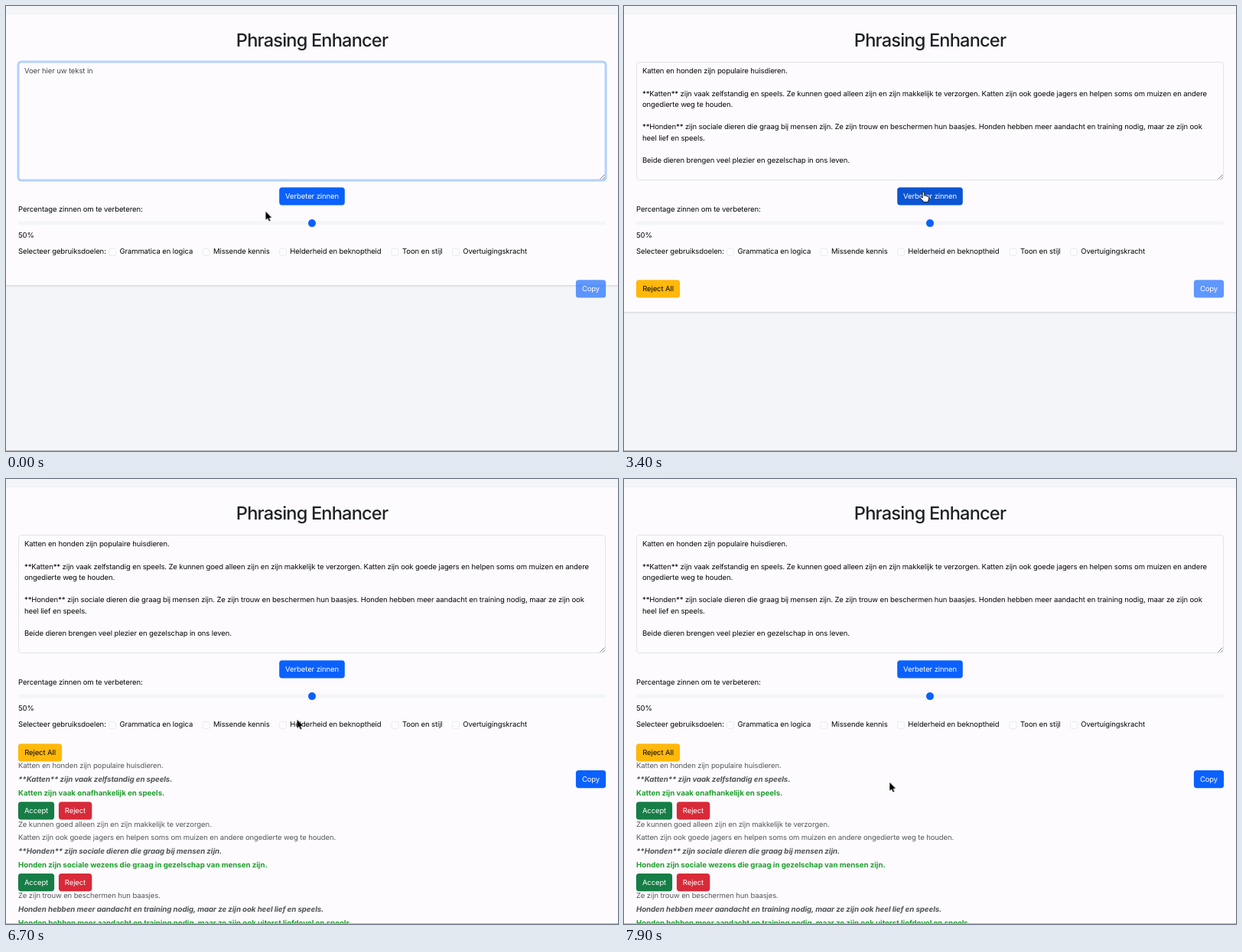
An HTML page for the animation above (8000 ms loop, 800 by 582 pixels).

```html
<!DOCTYPE html>
<html lang="nl">
<head>
<meta charset="utf-8">
<title>Phrasing Enhancer</title>
<style>
  html, body { margin: 0; width: 100%; height: 100%; overflow: hidden; background: #f4f5f8; }
  svg { display: block; width: 800px; height: 582px; }
  text {
    font: 400 9.5px Inter, Roboto, sans-serif;
    letter-spacing: -.105px;
    white-space: pre;
    text-rendering: geometricPrecision;
    fill: #050507;
  }
  .title { font-size: 23.6px; font-weight: 500; letter-spacing: -.82px; fill: #1f2226; }
  .mid { text-anchor: middle; }
  .light text { fill: #fff; }
  .hint { fill: #44484d; }
  .card, .field { fill: #fdfbfe; }
  .card { filter: drop-shadow(0 1px 1.5px rgba(0, 0, 0, .14)); }
  .field { stroke: #e2e4e9; }
  .kept { fill: #53575c; }
  .old, .new { font-size: 9.73px; font-weight: 700; }
  .old { fill: #505459; font-style: italic; letter-spacing: -.08px; }
  .new { fill: #1f9e2f; letter-spacing: -.035px; }
  .blue { fill: #0b61fd; }
  .green { fill: #177d46; }
  .red { fill: #d82a38; }
  .yellow { fill: #ffb80b; }

  .placeholder, .draft, .short, .waiting, .disabled, .results, .arrow, .hand {
    animation: 8s step-end infinite;
  }
  .placeholder { animation-name: placeholder; }
  .draft { animation-name: draft; }
  .short { animation-name: short; }
  .waiting { animation-name: waiting; }
  .disabled { animation-name: disabled; }
  .results { animation-name: results; }
  .arrow { animation-name: arrow; }
  .hand { animation-name: hand; }
  .ring { animation: ring 8s linear infinite; }
  .submit { animation: submit 8s linear infinite; }
  .page { animation: scroll 8s linear infinite; }
  .cursor { animation: move 8s linear infinite; }

  @keyframes placeholder { 0% { opacity: 1 } 1.25%, 100% { opacity: 0 } }
  @keyframes draft { 0% { opacity: 0 } 1.25%, 100% { opacity: 1 } }
  @keyframes short { 0% { opacity: 1 } 30%, 100% { opacity: 0 } }
  @keyframes waiting { 0% { opacity: 0 } 30% { opacity: 1 } 75%, 100% { opacity: 0 } }
  @keyframes disabled { 0% { opacity: .65 } 75%, 100% { opacity: 0 } }
  @keyframes results { 0% { opacity: 0 } 75%, 100% { opacity: 1 } }
  @keyframes arrow { 0% { opacity: 1 } 8.75% { opacity: 0 } 74%, 100% { opacity: 1 } }
  @keyframes hand { 0% { opacity: 0 } 8.75% { opacity: 1 } 74%, 100% { opacity: 0 } }
  @keyframes ring { 0%, 26.5% { opacity: 1 } 28.4%, 100% { opacity: 0 } }
  @keyframes submit {
    0%, 8.75% { fill: #0b61fd }
    10.6%, 26.5% { fill: #0b54d3 }
    28.4%, 29.9% { fill: #0a4cc4 }
    31.8%, 74% { fill: #0b54d3 }
    75.9%, 100% { fill: #0b61fd }
  }
  @keyframes scroll {
    0%, 84.4% { transform: none }
    86%, 88% { transform: translateY(-3.4px) }
    90%, 100% { transform: none }
  }
  @keyframes move {
    0%, 3.75% { transform: translate(339.5px, 268.8px) }
    17.5%, 60% { transform: translate(391px, 243px) }
    70%, 72% { transform: translate(391px, 246px) }
    82%, 87.5% { transform: translate(380.5px, 314.8px) }
    92.5% { transform: translate(373px, 360px) }
    98.75%, 100% { transform: translate(347.3px, 396.8px) }
  }
</style>
</head>
<body>
<svg viewBox="0 0 800 582">
  <defs>
    <rect id="box" x=".5" y=".5" width="9" height="9" rx="2" fill="#fdfbfe" stroke="#e9ebee"/>
    <g id="copy" class="light">
      <rect class="blue" x="744.9" width="39.2" height="23.2" rx="3.6"/>
      <text class="mid" x="764.5" y="15">Copy</text>
    </g>
    <g id="rejectAll">
      <rect class="yellow" x="15.9" width="57.2" height="23.2" rx="3.6"/>
      <text class="mid" x="44.5" y="15">Reject All</text>
    </g>
    <g id="choice" class="light">
      <rect class="green" x="15.9" width="47.2" height="23.2" rx="3.6"/>
      <text class="mid" x="39.5" y="15">Accept</text>
      <rect class="red" x="68.9" width="43.4" height="23.2" rx="3.6"/>
      <text class="mid" x="90.5" y="15">Reject</text>
    </g>
  </defs>

  <rect width="800" height="582" fill="#f4f5f8"/>
  <g class="page">
    <g class="short"><rect class="card" x="-5" y="11" width="810" height="354"/></g>
    <g class="waiting">
      <rect class="card" x="-5" y="11" width="810" height="389"/>
      <use href="#rejectAll" y="358.3"/>
    </g>
    <g class="results"><rect class="card" x="-5" y="11" width="810" height="600"/></g>

    <text class="title mid" x="400" y="53">Phrasing Enhancer</text>

    <rect class="field" x="16.5" y="73.5" width="767" height="154" rx="3.6"/>
    <rect class="ring" x="16" y="73" width="768" height="155" rx="3.8" fill="none" stroke="#b3d1fc" stroke-width="3"/>
    <path d="M776.5 226.5l6-6M780 226.5l2.5-2.5" stroke="#666" stroke-width=".8"/>
    <text class="placeholder hint" x="24" y="88.3">Voer hier uw tekst in</text>
    <g class="draft">
      <text x="24" y="88.3">Katten en honden zijn populaire huisdieren.</text>
      <text x="24" y="117.5">**Katten** zijn vaak zelfstandig en speels. Ze kunnen goed alleen zijn en zijn makkelijk te verzorgen. Katten zijn ook goede jagers en helpen soms om muizen en andere</text>
      <text x="24" y="132.1">ongedierte weg te houden.</text>
      <text x="24" y="161.3">**Honden** zijn sociale dieren die graag bij mensen zijn. Ze zijn trouw en beschermen hun baasjes. Honden hebben meer aandacht en training nodig, maar ze zijn ook</text>
      <text x="24" y="175.9">heel lief en speels.</text>
      <text x="24" y="205.1">Beide dieren brengen veel plezier en gezelschap in ons leven.</text>
    </g>

    <g class="light">
      <rect class="submit" x="357.2" y="237.2" width="85.6" height="23.2" rx="3.6"/>
      <text class="mid" x="400" y="252.4">Verbeter zinnen</text>
    </g>

    <text x="16" y="269.4">Percentage zinnen om te verbeteren:</text>
    <rect x="16" y="281.6" width="768" height="4.8" rx="2.4" fill="#f3f5f8"/>
    <circle class="blue" cx="400" cy="284.1" r="5"/>
    <text x="16" y="303.4">50%</text>

    <text x="16" y="324.4">Selecteer gebruiksdoelen:</text>
    <use href="#box" x="134" y="317"/>
    <text x="148.5" y="324.4">Grammatica en logica</text>
    <use href="#box" x="256.5" y="317"/>
    <text x="271" y="324.4">Missende kennis</text>
    <use href="#box" x="357" y="317"/>
    <text x="371.3" y="324.4">Helderheid en beknoptheid</text>
    <use href="#box" x="503.5" y="317"/>
    <text x="518" y="324.4">Toon en stijl</text>
    <use href="#box" x="583" y="317"/>
    <text x="597.3" y="324.4">Overtuigingskracht</text>

    <g class="disabled"><use href="#copy" y="358.3"/></g>

    <g class="results">
      <use href="#rejectAll" y="346.2"/>
      <use href="#copy" y="381"/>
      <text class="kept" x="16" y="378.3">Katten en honden zijn populaire huisdieren.</text>
      <text class="old" x="16" y="396">**Katten** zijn vaak zelfstandig en speels.</text>
      <text class="new" x="16" y="413.7">Katten zijn vaak onafhankelijk en speels.</text>
      <use href="#choice" y="422.2"/>
      <text class="kept" x="16" y="454.5">Ze kunnen goed alleen zijn en zijn makkelijk te verzorgen.</text>
      <text class="kept" x="16" y="472.2">Katten zijn ook goede jagers en helpen soms om muizen en andere ongedierte weg te houden.</text>
      <text class="old" x="16" y="489.8">**Honden** zijn sociale dieren die graag bij mensen zijn.</text>
      <text class="new" x="16" y="507.5">Honden zijn sociale wezens die graag in gezelschap van mensen zijn.</text>
      <use href="#choice" y="516"/>
      <text class="kept" x="16" y="548.4">Ze zijn trouw en beschermen hun baasjes.</text>
      <text class="old" x="16" y="566">Honden hebben meer aandacht en training nodig, maar ze zijn ook heel lief en speels.</text>
      <text class="new" x="16" y="583.6">Honden hebben meer aandacht en training nodig, maar ze zijn ook uiterst liefdevol en speels.</text>
    </g>
  </g>

  <rect y="581" width="800" height="1" fill="#b4b5b7"/>

  <g class="cursor">
    <path class="arrow" d="M0 0V11L2.6 8.6L4.3 12.6L6.1 11.9L4.4 8H7.8Z" fill="#000" stroke="#fff" stroke-width=".9" paint-order="stroke"/>
    <g class="hand">
      <path transform="translate(-4 0)" d="M3.2 8V1.4a1.2 1.2 0 0 1 2.4 0V5.2C6.4 4.6 7.4 4.8 7.7 5.5 8.5 5 9.4 5.3 9.6 6.1 10.6 5.7 11.4 6.3 11.4 7.3V9.6C11.4 11 10.4 11.8 10.2 13.4H4.6C4.2 11.6 1.6 10 .7 8.4 .1 7.2 1.4 6.3 2.2 7.1Z" fill="#fff" stroke="#000" stroke-width=".9" stroke-linejoin="round"/>
    </g>
  </g>
</svg>
</body>
</html>
```
